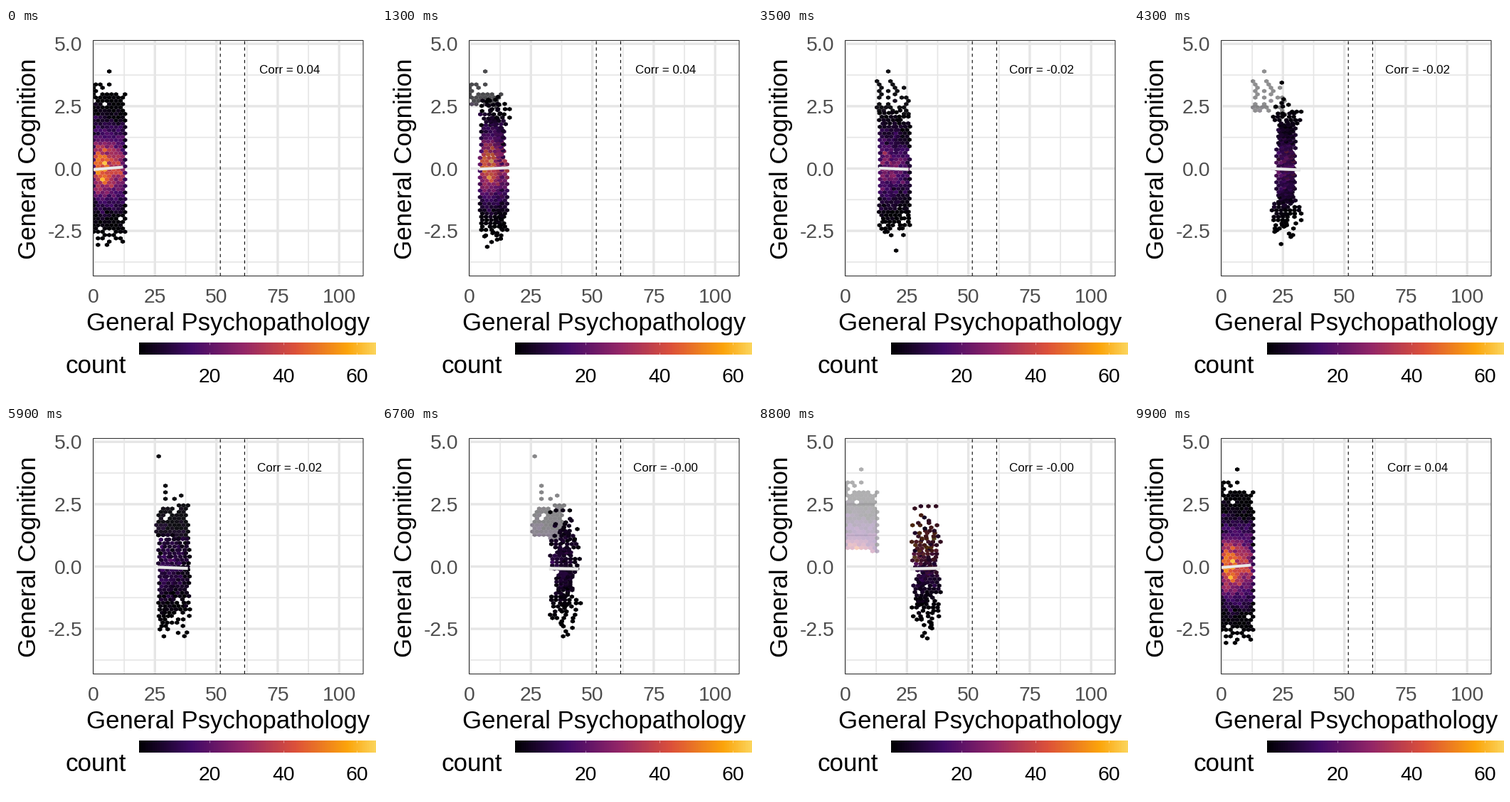
A matplotlib script for the animation above (10 s loop, 520x520 px).

```python
import numpy as np
import matplotlib.pyplot as plt
from matplotlib import colormaps
from matplotlib.animation import FuncAnimation
from matplotlib.collections import PolyCollection
from matplotlib.colors import LinearSegmentedColormap
from matplotlib.patches import Polygon, Rectangle

SIZE, DPI, FRAMES = 520, 100, 100
PT = 72 / DPI                      # points per pixel
LEFT, RIGHT, TOP, BOTTOM = 122.5, 502, 17.5, 348.5
PITCH, ROW = 6.32, 4.6             # hexagon spacing in pixels
BASE, ZERO_ROW = 314, 25.3         # pixel y of row 0, row where y = 0
SLICE_COLS = 7
MAX_COUNT = 72
STOPS = colormaps["inferno"](np.linspace(0, 1, 6))
CMAP = LinearSegmentedColormap.from_list("heat", STOPS)

CORRELATIONS = np.array([0.04, -0.02, -0.02, -0.001])
LABELS = [f"Corr = {c:.2f}" for c in CORRELATIONS]
HOLD_ENDS = (8, 34, 58, 83)
ARRIVALS = (25, 50, 75, 99)

plt.rcParams["font.family"] = "Liberation Sans"


def data_x(v):
    return 123 + 3.452 * v


def data_y(v):
    return 197.5 - 35.04 * v


def expected_count(row, col, first):
    """Mean count of a hexagon; those on a slice's rim hold half."""
    y = (row - ZERO_ROW) / 7.6
    spread = 0.98 if y > 0 else 0.88
    peak = 62 * (1 - np.exp(-(col + 1))) * np.exp(-col / 9.5)
    rim = 0.5 if col in (first, first + SLICE_COLS) else 1
    tail = 0.3 * np.exp(-y ** 2 / 8)
    return rim * (peak * np.exp(-0.5 * (y / spread) ** 2) + tail)


def make_slice(index, total, stray):
    """Hexagon centres and colours of one slice, from bottom to top."""
    rng = np.random.default_rng(21 + index)
    first = SLICE_COLS * index
    cells = []
    for row in range(53):
        half = row % 2
        for k in range(SLICE_COLS + 1 - half):
            col = first + k + half / 2
            mean = expected_count(row, col, first)
            count = max(1, rng.poisson(mean))
            cells.append((mean / rng.exponential(), row, col, count))
    cells.sort(reverse=True)
    found = {(r, c): n for _, r, c, n in cells[:total - 1]}
    found.setdefault(stray, 1)
    keys = sorted(found)
    centres = np.array([(123 + PITCH * c, BASE - ROW * r) for r, c in keys])
    counts = np.array([found[k] for k in keys])
    return centres, CMAP((counts - 1) / (MAX_COUNT - 1))


def make_trend(index):
    """Ends of a slice's trend line and half the height of its band."""
    x = 123 + PITCH * SLICE_COLS * index
    mid = 197.2 + 0.5 * index ** 2
    rise = 42 * CORRELATIONS[index]
    return np.array([x, mid + rise, x + 41.5, mid - rise, 1.2 + 0.6 * index])


SLICES = [make_slice(0, 330, (55, 3.5)), make_slice(1, 297, (55, 9.5)),
          make_slice(2, 263, (59, 14.5)), make_slice(3, 192, (50, 23))]
TRENDS = [make_trend(i) for i in range(4)]

angles = np.radians(np.arange(30, 390, 60))
HEXAGON = np.column_stack([np.cos(angles) * PITCH / np.sqrt(3),
                           np.sin(angles) * ROW * 2 / 3])

fig = plt.figure(figsize=(SIZE / DPI, SIZE / DPI), dpi=DPI, facecolor="white")
ax = fig.add_axes([0, 0, 1, 1])
ax.axis("off")

panel = Rectangle((LEFT, TOP), RIGHT - LEFT, BOTTOM - TOP, fill=False,
                  ec="#333333", lw=1.1 * PT, zorder=8, snap=False)
ax.add_patch(panel)


def line(xs, ys, width, color, zorder, **style):
    art, = ax.plot(xs, ys, color=color, lw=width * PT, zorder=zorder,
                   solid_capstyle="butt", dash_capstyle="butt", snap=False,
                   **style)
    art.set_clip_path(panel)
    return art


def text(x, y, s, px, color="black", **style):
    style.setdefault("ha", "center")
    return ax.text(x, y, s, fontsize=px * PT, color=color, va="baseline",
                   zorder=9, **style)


def draw_grid():
    for i in range(9):
        x = data_x(12.5 * i)
        line([x, x], [TOP, BOTTOM], 1.7 if i % 2 else 3.4, "#e6e6e6", 1)
    for i in range(-3, 5):
        y = data_y(1.25 * i)
        line([LEFT, RIGHT], [y, y], 1.7 if i % 2 else 3.4, "#e6e6e6", 1)
    for x in (301.2, 335.4):
        line([x, x], [BOTTOM, TOP], 1.1, "black", 7, linestyle=(0, (4, 4)))


def draw_labels():
    for v in range(0, 101, 25):
        text(data_x(v), 386, str(v), 28.4, "#4d4d4d")
    for v in np.arange(-2.5, 5.1, 2.5):
        text(107, data_y(v) + 10, f"{v:.1f}", 28.4, "#4d4d4d", ha="right")
    text(312.5, 425.5, "General Psychopathology", 34.8)
    text(42.5, 183.5, "General Cognition", 35, rotation=90,
         rotation_mode="anchor")


def draw_legend():
    text(126, 485, "count", 35)
    left, step = 187, 5.175
    ax.imshow(np.linspace(0, 1, 400)[None, :], cmap=CMAP, aspect="auto",
              extent=(left, left + step * (MAX_COUNT - 1), 459, 442),
              zorder=2)
    for v in (20, 40, 60):
        x = 286.3 + step * (v - 20)
        for y in (442, 455.6):
            ax.plot([x, x], [y, y + 3.4], color="white", lw=0.6 * PT,
                    alpha=0.7, solid_capstyle="butt", zorder=3)
        text(x, 497.5, str(v), 28.4)


draw_grid()
draw_labels()
draw_legend()
ax.set_xlim(0, SIZE)
ax.set_ylim(SIZE, 0)

hexes = PolyCollection([], linewidths=0, edgecolors="none", zorder=4)
ax.add_collection(hexes, autolim=False)
hexes.set_clip_path(panel)
band = Polygon(np.zeros((4, 2)), fc="#999999", alpha=0.4, lw=0, zorder=5)
ax.add_patch(band)
band.set_clip_path(panel)
trend = line([], [], 4, "#e8e8e8", 6)
corr = text(398.5, 64, LABELS[0], 17)


def faded(colors, alpha):
    out = colors.copy()
    out[:, 3] = alpha
    return out


def pose(frame):
    """Current slice, next slice and progress between them."""
    for i, (start, end) in enumerate(zip(HOLD_ENDS, ARRIVALS)):
        if frame < end:
            return i, (i + 1) % 4, max(0, (frame - start) / (end - start))
    return 0, 1, 0


def update(frame):
    a, b, p = pose(frame)
    (pos_a, col_a), (pos_b, col_b) = SLICES[a], SLICES[b]
    n = min(len(pos_a), len(pos_b))
    # Surplus hexagons fade in place, the others travel in matched order.
    centres = np.vstack([pos_a[n:], pos_b[n:],
                         pos_a[:n] * (1 - p) + pos_b[:n] * p])
    colors = np.vstack([faded(col_a[n:], 1 - p), faded(col_b[n:], p),
                        col_a[:n] * (1 - p) + col_b[:n] * p])
    hexes.set_verts(centres[:, None, :] + HEXAGON)
    hexes.set_facecolor(colors)

    x0, y0, x1, y1, h = TRENDS[a] * (1 - p) + TRENDS[b] * p
    trend.set_data([x0, x1], [y0, y1])
    band.set_xy([(x0, y0 - h), (x1, y1 - h), (x1, y1 + h), (x0, y0 + h)])
    corr.set_text(LABELS[b if p > 0.5 else a])
    return hexes, band, trend, corr


anim = FuncAnimation(fig, update, frames=FRAMES, interval=100, repeat=True,
                     repeat_delay=0, blit=False)
plt.show()
```
